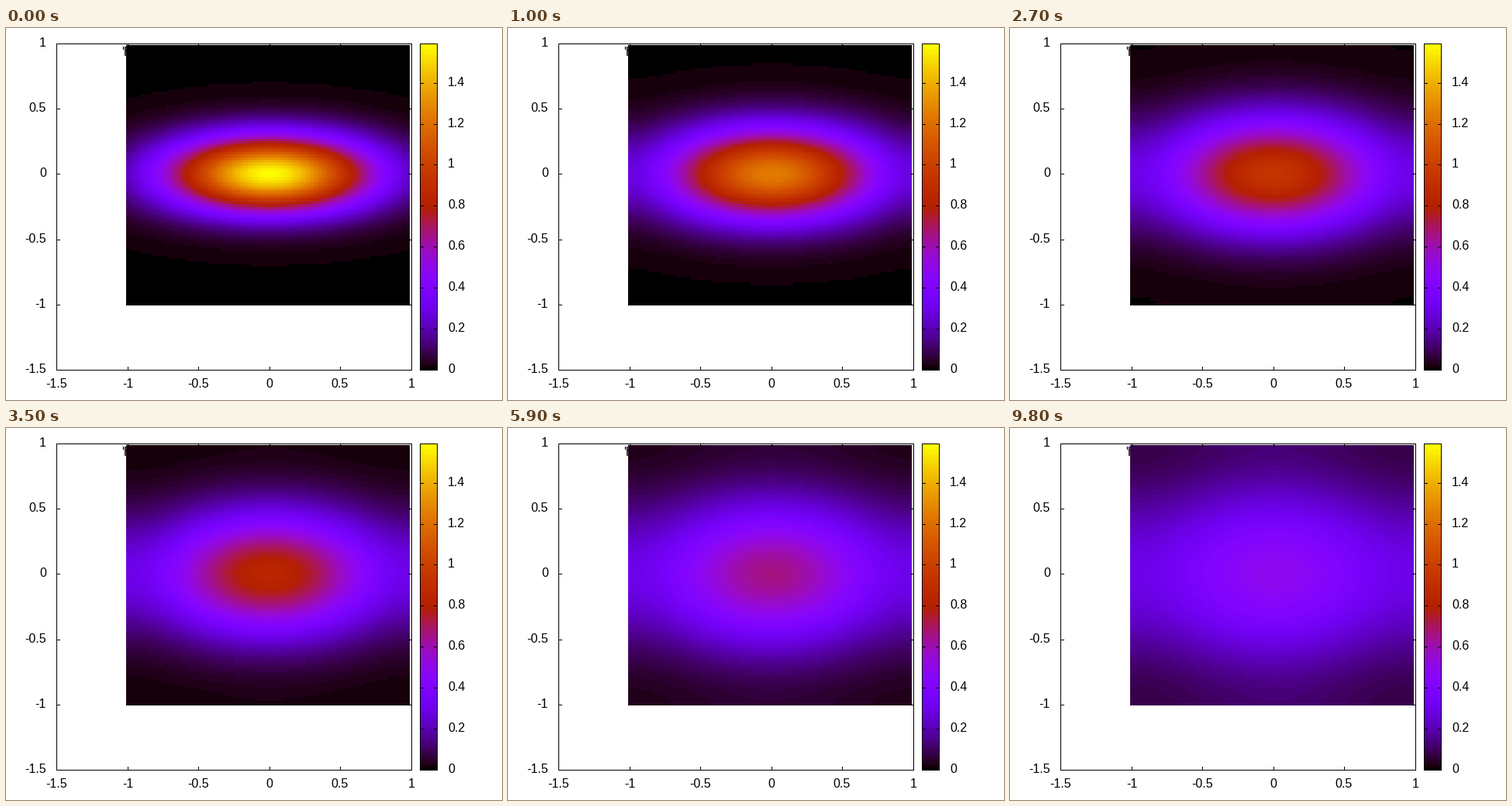
Animation, 640 px wide and 480 px high, one loop 10000 ms. Source, as a matplotlib script:

```python
import numpy as np
import matplotlib.pyplot as plt
from matplotlib.animation import FuncAnimation
from matplotlib.patches import Rectangle

W, H, DPI = 640, 480, 100
FRAMES, INTERVAL = 100, 100
LEFT, RIGHT, TOP, BOTTOM = 65, 523, 20, 441
BAR_L, BAR_R = 534, 556
MAP_L, MAP_R, MAP_T, MAP_B = 155, 521, 22, 358
VAR_X, VAR_Y, VAR_STEP = 0.25, 0.04, 0.002
PEAK = 1 / (2 * np.pi * np.sqrt(VAR_X * VAR_Y))
LEVELS = 128
FLOOR = 0.00212  # values below this stay pure black

fig = plt.figure(figsize=(W / DPI, H / DPI), dpi=DPI, facecolor="white")
ax = fig.add_axes([0, 0, 1, 1])
ax.set_axis_off()

# Classic black-blue-red-yellow palette
gray = np.linspace(0, 1, LEVELS)
PALETTE = np.stack(
    [np.sqrt(gray), gray**3, np.clip(np.sin(2 * np.pi * gray), 0, 1)], axis=1
)


def to_rgb(z):
    idx = np.clip(np.rint(z * (LEVELS - 1)), 1, LEVELS - 1).astype(int)
    return PALETTE[np.where(z < FLOOR, 0, idx)]


# Heat equation on [-1, 1] with insulated walls, as a cosine series
modes = np.arange(90)
fine = np.linspace(-1, 1, 2001)
weight = np.full(fine.size, fine[1] - fine[0])
weight[[0, -1]] /= 2
cells = -1 + 0.02 * np.arange(100)
basis = np.cos(np.pi * np.outer(cells, modes))


def series(var):
    start = np.exp(-fine**2 / (2 * var)) * weight
    coef = np.cos(np.pi * np.outer(modes, fine)) @ start
    coef[0] /= 2
    return coef


COEF_X, COEF_Y = series(VAR_X), series(VAR_Y)


def profile(coef, var, growth):
    if growth == 0:
        return np.exp(-cells**2 / (2 * var))
    return basis @ (coef * np.exp(-((modes * np.pi) ** 2) * growth / 2))


def cell_index(pixels, origin, scale):
    pos = (pixels + 0.5 - origin) / scale
    return np.clip(np.floor((pos + 1.01) / 0.02), 0, 99).astype(int)


def px_x(v):
    return LEFT + (v + 1.5) / 2.5 * (RIGHT - LEFT)


def px_y(v):
    return TOP + (1 - v) / 2.5 * (BOTTOM - TOP)


cols = cell_index(np.arange(MAP_L, MAP_R), px_x(0) + 0.3, px_x(1) - px_x(0))
rows = cell_index(np.arange(MAP_T, MAP_B), px_y(0), px_y(1) - px_y(0))


def heat(i):
    growth = VAR_STEP * i
    z = np.outer(profile(COEF_Y, VAR_Y, growth), profile(COEF_X, VAR_X, growth))
    return to_rgb(z)[np.ix_(rows, cols)]


def picture(data, x0, x1, y0, y1, z):
    return ax.imshow(data, extent=(x0, x1, y1, y0), interpolation="nearest",
                     aspect="auto", zorder=z)


def bar(x, y, w, h):
    ax.add_patch(Rectangle((x, y), w, h, facecolor="black", linewidth=0,
                           antialiased=False, zorder=5))


def box(x0, y0, x1, y1):
    for y in (y0, y1):
        bar(x0, y, x1 - x0 + 1, 1)
    for x in (x0, x1):
        bar(x, y0, 1, y1 - y0 + 1)


def label(x, y, s, align):
    ax.text(x, y, s, ha=align, va="baseline", family="Liberation Sans",
            fontsize=11.5, color="black", zorder=1)


image = picture(heat(0), MAP_L, MAP_R, MAP_T, MAP_B, 3)

ramp = (BOTTOM - np.arange(TOP, BOTTOM)) / (BOTTOM - TOP)
steps = np.minimum((ramp * LEVELS).astype(int), LEVELS - 1)
picture(PALETTE[steps][:, None, :], BAR_L, BAR_R, TOP, BOTTOM, 3)

box(LEFT, TOP, RIGHT, BOTTOM)
box(BAR_L, TOP, BAR_R, BOTTOM)

for v in np.arange(-1.5, 1.01, 0.5):
    x, y = int(px_x(v) + 0.5), int(px_y(v) + 0.5)
    bar(x, TOP, 1, 5)
    bar(x, BOTTOM - 4, 1, 5)
    bar(LEFT, y, 5, 1)
    bar(RIGHT - 4, y, 5, 1)
    label(x, 464, f"{v:g}", "center")
    label(52, y + 4, f"{v:g}", "right")

for k in range(8):
    v = 0.2 * k
    y = int(BOTTOM - v / PEAK * (BOTTOM - TOP) + 0.5)
    bar(BAR_L, y, 5, 1)
    bar(BAR_R - 4, y, 5, 1)
    label(570, y + 4, f"{v:g}", "left")

# Key text, mostly covered by the map
label(149, 36, "'h", "left")

ax.set_xlim(0, W)
ax.set_ylim(H, 0)


def update(i):
    image.set_data(heat(i))
    return (image,)


anim = FuncAnimation(fig, update, frames=FRAMES, interval=INTERVAL,
                     repeat=True, repeat_delay=0)
plt.show()
```
